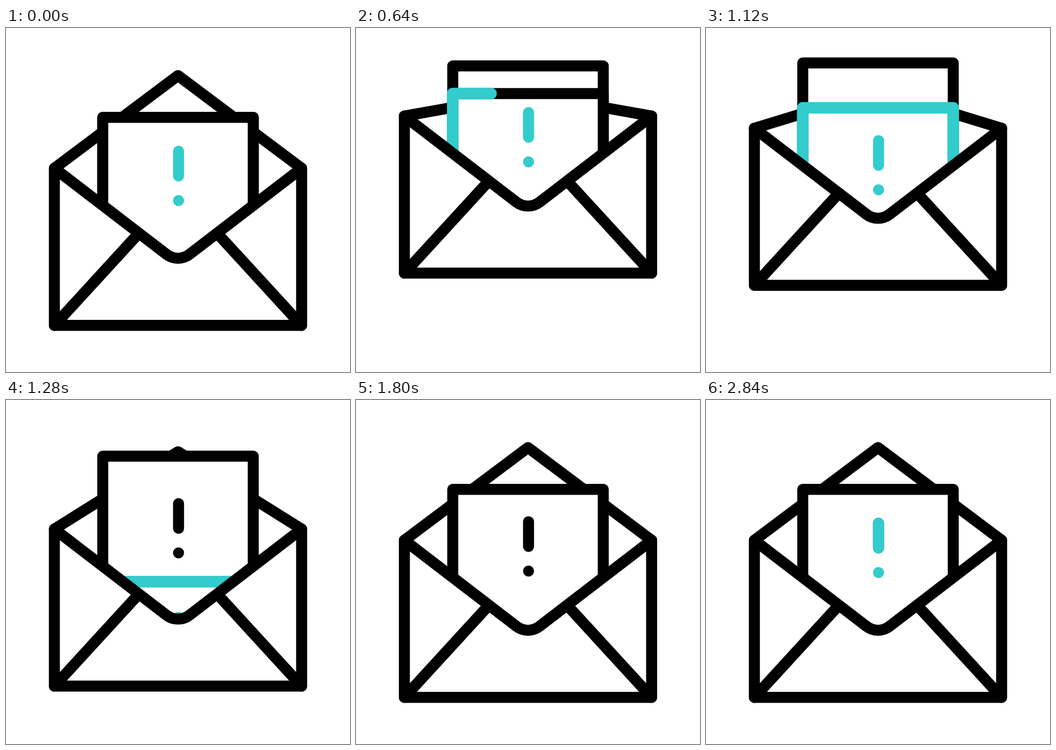
Write an HTML page with a canvas that moves like this. It is 640 by 640 pixels and loops after 3000 ms.

```html
<!DOCTYPE html>
<html lang="en">
<head>
<meta charset="utf-8">
<title>Alert mail</title>
<style>
  html, body { margin: 0; width: 100%; height: 100%; overflow: hidden; background: #fff; }
  canvas { display: block; }
</style>
</head>
<body>
<canvas id="stage" width="640" height="640"></canvas>
<script>
const ctx = document.getElementById('stage').getContext('2d');
const LOOP = 3000, STEP = 40, GLIDE = 760;
const BLACK = '#000', CYAN = '#33cccc', WHITE = '#fff';
const LINE = 20.5, ACCENT = 21.5;
const LEFT = 90, RIGHT = 550, MID = 320, SHOULDER = 261, FLOOR = 553.2, FOLD = 437.6;
const CARD_LEFT = 180, CARD_RIGHT = 460, CARD_HEIGHT = 500, CARD_REST = 166.3;
const MARK_X = 321, MARK_REST = 321, BAR_RISE = 91.7, BAR_LENGTH = 46;

// Cubic Bezier easing with flat ends; x1 and x2 place the handles.
const bezier = (x1, x2) => x => {
  if (x <= 0 || x >= 1) return x <= 0 ? 0 : 1;
  let low = 0, high = 1, u;
  for (let i = 0; i < 24; i++) {
    u = (low + high) / 2;
    const at = 3 * x1 * u * (1 - u) ** 2 + 3 * x2 * u * u * (1 - u) + u ** 3;
    if (at < x) low = u; else high = u;
  }
  return u * u * (3 - 2 * u);
};
const snap = bezier(0.62, 0.11), settle = bezier(0.33, 0.1);

const to = (target, start, duration = GLIDE, ease = snap) => ({ target, start, duration, ease });
const move = (rest, ...steps) => t => steps.reduce(
  (v, s) => v + (s.target - v) * s.ease((t - s.start) / s.duration), rest);

const lift = move(0, to(-103.4, 118), to(0, 984, 640, settle));
const flapHeight = move(172.5, to(30.5, 139), to(172.5, 984, 640, settle));
const backCard = move(CARD_REST, to(61.5, 153), to(CARD_REST, 993));
const frontCard = move(CARD_REST, to(118, 147), to(435, 930));
const frontMark = move(MARK_REST, to(244, 126), to(561, 888));
const backMarkOffset = move(180, to(129.2, 1487), to(MARK_REST - CARD_REST, 2240, 600));
const borderTip = move(-300, to(580, 351));
const barTip = move(0, to(BAR_LENGTH, 2220, 400));

function stroke(points, color, width = LINE) {
  ctx.beginPath();
  points.forEach(([x, y]) => ctx.lineTo(x, y));
  ctx.strokeStyle = color;
  ctx.lineWidth = width;
  ctx.stroke();
}

function traceFold(shift) {
  ctx.moveTo(LEFT, SHOULDER + shift);
  ctx.arcTo(MID, FOLD + shift, RIGHT, SHOULDER + shift, 35);
  ctx.lineTo(RIGHT, SHOULDER + shift);
}

function drawCard(top) {
  const bottom = top + CARD_HEIGHT;
  ctx.fillStyle = WHITE;
  ctx.fillRect(CARD_LEFT, top, CARD_RIGHT - CARD_LEFT, CARD_HEIGHT);
  stroke([[CARD_LEFT, bottom], [CARD_LEFT, top], [CARD_RIGHT, top], [CARD_RIGHT, bottom]], BLACK);
}

// The tip is measured along the border from the top left corner.
function drawBorder(top, tip) {
  const width = CARD_RIGHT - CARD_LEFT;
  const points = [[CARD_LEFT, top + CARD_HEIGHT], [CARD_LEFT, top + Math.max(0, -tip)]];
  if (tip > 0) points.push([CARD_LEFT + Math.min(tip, width), top]);
  if (tip > width) points.push([CARD_RIGHT, top + tip - width]);
  stroke(points, CYAN, ACCENT);
}

function drawBar(dotY, length, color) {
  const top = dotY - BAR_RISE;
  stroke([[MARK_X, top], [MARK_X, top + Math.max(length, 0.01)]], color);
}

function drawDot(y, color) {
  ctx.beginPath();
  ctx.arc(MARK_X, y, LINE / 2, 0, Math.PI * 2);
  ctx.fillStyle = color;
  ctx.fill();
}

function drawCards(t, shift) {
  ctx.save();
  ctx.beginPath();
  traceFold(shift);
  ctx.lineTo(RIGHT, -50);
  ctx.lineTo(LEFT, -50);
  ctx.clip();

  const backTop = backCard(t), backDot = backTop + backMarkOffset(t);
  drawCard(backTop);
  drawBar(backDot, BAR_LENGTH, BLACK);
  drawDot(backDot, t >= 2560 ? CYAN : BLACK);
  if (t >= 2240) drawBar(backDot, barTip(t), CYAN);

  if (t < 1720) {
    const frontTop = frontCard(t), frontDot = frontMark(t);
    drawCard(frontTop);
    drawBorder(frontTop, borderTip(t));
    drawBar(frontDot, BAR_LENGTH, CYAN);
    drawDot(frontDot, CYAN);
  }
  ctx.restore();
}

function drawEnvelope(shift) {
  const shoulder = SHOULDER + shift, floor = FLOOR + shift, seam = 382 + shift;
  stroke([[LEFT, shoulder], [LEFT, floor], [RIGHT, floor], [RIGHT, shoulder]], BLACK);
  stroke([[LEFT, floor], [247, seam]], BLACK);
  stroke([[RIGHT, floor], [393, seam]], BLACK);
  ctx.beginPath();
  traceFold(shift);
  ctx.stroke();
}

function draw(t) {
  const shift = lift(t), shoulder = SHOULDER + shift;
  ctx.fillStyle = WHITE;
  ctx.fillRect(0, 0, 640, 640);
  ctx.lineCap = ctx.lineJoin = 'round';
  stroke([[LEFT, shoulder], [MID, shoulder - flapHeight(t)], [RIGHT, shoulder]], BLACK);
  drawCards(t, shift);
  drawEnvelope(shift);
}

const start = performance.now();
function tick() {
  const t = (performance.now() - start) % LOOP;
  draw(Math.floor(t / STEP) * STEP);
  requestAnimationFrame(tick);
}
tick();
</script>
</body>
</html>
```
